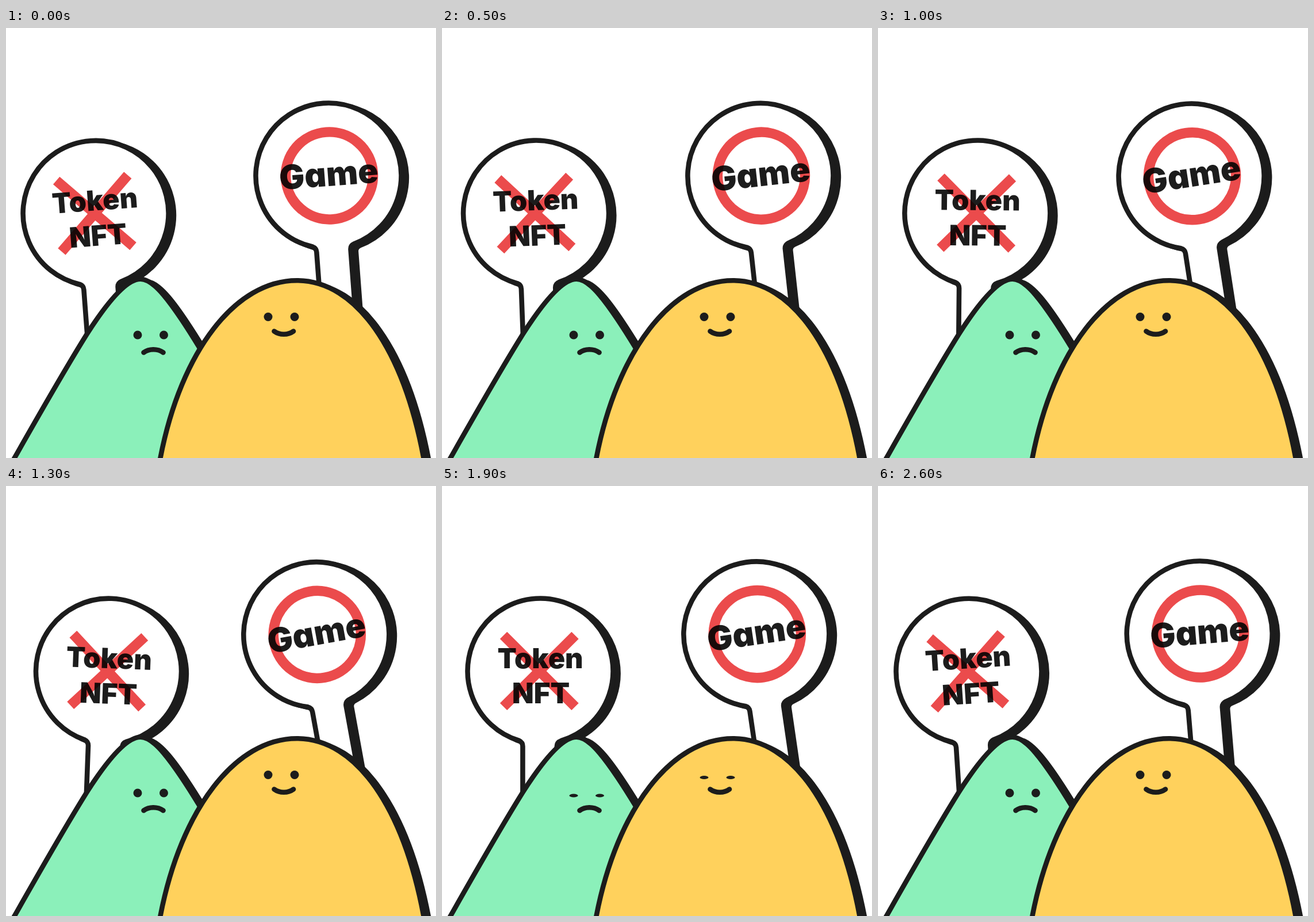
Animation, 748 px wide and 748 px high, one loop 2.7 s. Source, as an HTML page:

```html
<!DOCTYPE html>
<html lang="en">
<head>
<meta charset="utf-8">
<title>Two signs</title>
<style>
  html, body { margin: 0; height: 100%; overflow: hidden; background: #fff; }
  svg { display: block; width: 100%; height: 100%; }
  .line { stroke: #1c1c1c; stroke-width: 8.6; stroke-linejoin: round; }
  .shade { fill: #1c1c1c; }
  .paper { fill: #fff; }
  .green { fill: #8bf0ba; }
  .yellow { fill: #ffd15c; }
  .mark { fill: none; stroke: #eb4b4c; stroke-width: 17.5; mix-blend-mode: multiply; }
  .mouth { fill: none; stroke: #1c1c1c; stroke-width: 8.6; stroke-linecap: round; }
  .eye { fill: #1c1c1c; }
  text {
    font-family: Inter, "Open Sans", sans-serif;
    font-weight: 900;
    font-feature-settings: "cv11";
    text-anchor: middle;
    fill: #1c1c1c;
  }
</style>
</head>
<body>
<svg viewBox="0 0 748 748">
  <defs>
    <path id="board" d="M-30.6 245V131Q-30.6 124 -37 121A126.5 126.5 0 1 1 36 121.3Q28.8 124 28.8 131V245Z"/>
    <path id="cone" d="M9 758C59 670 99 599 141 532C164 496 205 436.7 234 436.7C256 436.7 284 470 336.500 556L440 780H0Z"/>
    <path id="dome" d="M263.500 775L268.500 748C305 560 400 439.2 506 439.2C610 439.2 691 560 726.500 748L731.500 775Z"/>
  </defs>

  <g id="no">
    <g transform="translate(156.1 322.4) rotate(-4.3)">
      <use href="#board" x="9" y="4" class="line shade"/>
      <use href="#board" class="line paper"/>
      <text x="0" y="-5" font-size="48.500">Token</text>
      <text x="1" y="56.500" font-size="49">NFT</text>
      <path class="mark" d="M-64 -62L60.500 62M60.500 -62L-64 62"/>
    </g>
  </g>
  <use href="#cone" x="9" y="4" class="line shade"/>
  <use href="#cone" class="line green"/>

  <g id="yes">
    <g transform="translate(561 257) rotate(-4.3)">
      <use href="#board" x="9" y="4" class="line shade"/>
      <use href="#board" class="line paper"/>
      <text x="0.500" y="18" font-size="58.500">Game</text>
      <circle class="mark" cx="1.500" r="76"/>
    </g>
  </g>
  <use href="#dome" x="9" y="4" class="line shade"/>
  <use href="#dome" class="line yellow"/>

  <path class="mouth" d="M239.500 564.500C249 557.500 264 557.500 273.500 564.500M466.500 527.500C476 534.500 490.500 534.500 500 527.500"/>
  <ellipse class="eye" cx="229" cy="534" rx="7.500"/>
  <ellipse class="eye" cx="274.500" cy="534" rx="7.500"/>
  <ellipse class="eye" cx="456" cy="502.500" rx="7.500"/>
  <ellipse class="eye" cx="502" cy="502.500" rx="7.500"/>
</svg>
<script>
  const LOOP = 2700, STEP = 100, HALF = 13, EYE = 7.5;
  const blink = { 17: 0.75, 18: 0.4, 19: 0.75 };
  const signs = [
    { el: document.getElementById("no"), turn: 0.538, pivot: "170 521" },
    { el: document.getElementById("yes"), turn: -0.5, pivot: "566 460" }
  ];
  const eyes = [...document.querySelectorAll(".eye")].map(el => ({
    el, base: Number(el.getAttribute("cy")) + EYE
  }));

  function draw(time) {
    // The first pose is held for two steps.
    const step = Math.max(0, Math.floor((time % LOOP) / STEP) - 1);
    const swing = HALF - Math.abs(HALF - step);
    for (const { el, turn, pivot } of signs) {
      el.setAttribute("transform", `rotate(${turn * swing} ${pivot})`);
    }
    const ry = EYE * (blink[step] ?? 1);
    for (const { el, base } of eyes) {
      el.setAttribute("ry", ry);
      el.setAttribute("cy", base - ry);
    }
  }

  const start = performance.now();
  function tick() {
    draw(performance.now() - start);
    requestAnimationFrame(tick);
  }
  tick();
</script>
</body>
</html>
```
